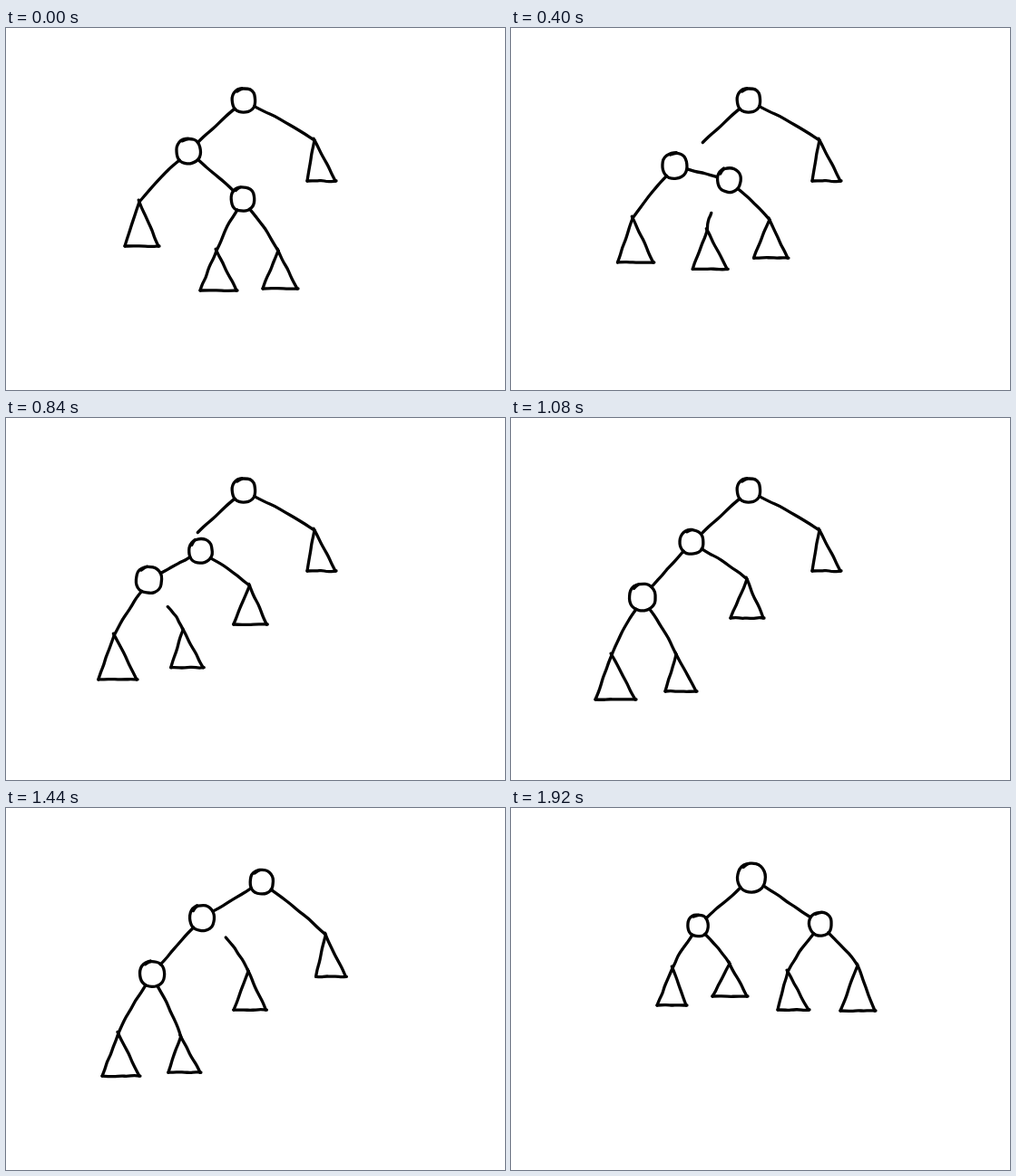
Write an HTML page with a canvas that moves like this. It is 550 px wide and 400 px high and loops after 2160 ms.

```html
<!DOCTYPE html>
<html lang="en">
<head>
<meta charset="utf-8">
<title>Tree rotation</title>
<style>
html, body { margin: 0; width: 550px; height: 400px; overflow: hidden; background: #fff; }
canvas { display: block; }
</style>
</head>
<body>
<canvas id="stage" width="550" height="400"></canvas>
<script>
const ctx = document.getElementById('stage').getContext('2d');
const LOOP = 2160;

// Pace of redrawing: from this time on, one drawing per interval
const paces = [[0, 160], [160, 80], [320, 40], [720, 80], [1080, 200], [1280, 80], [1840, 40], [1920, 240]];

// Every part has three resting poses and, for each of the two rotations, a bend of its path
const part = (poses, ...bends) => ({ poses, bends });

// Nodes: centre x, y, radius
const root = part([[262, 80, 13.5], [262, 80, 13.5], [341, 128, 13]], [0, 0], [-1, -14]);
const left = part([[201, 136, 14], [145, 198, 15], [206, 130, 12]], [-2, -5], [0, 4]);
const inner = part([[261, 189, 13.5], [199, 137, 13.5], [265, 77, 16]], [0, -4], [0, 0]);

// Subtrees: apex x, y, reach to the left and right, height
const leafA = part([[147, 192, 16, 21, 49], [111, 262, 18, 26, 49], [178, 177, 17, 15, 41]], [-1, -6], [-6, 12]);
const leafB = part([[232, 246, 18, 22, 44], [182, 261, 12, 22, 41], [241, 172, 19, 19, 36]], [1, -31], [-6, 19]);
const leafC = part([[300, 246, 17, 21, 42], [260, 178, 18, 18, 43], [305, 181, 11, 23, 42]], [-2, -13], [-6, 2]);
const leafD = part([[340, 124, 8, 23, 45], [340, 124, 8, 23, 45], [382, 174, 19, 19, 50]], [0, 0], [2, 4]);

const clamp = v => Math.min(1, Math.max(0, v));
const mix = (a, b, u) => a.map((v, i) => v + (b[i] - v) * u);

function at({ poses, bends }, turn, u) {
  const [x, y, ...size] = mix(poses[turn], poses[turn + 1], u);
  const [dx, dy] = bends[turn].map(d => d * 4 * u * (1 - u));
  return [x + dx, y + dy, ...size];
}

// Repeatable noise from a place, so parts at rest keep their shape
function noise(x, y) {
  const n = Math.sin(x * 12.9898 + y * 78.233) * 43758.5453;
  return (n - Math.floor(n)) * 2 - 1;
}

// Point on a node's outline that faces another place
function rim([x, y, r], [tx, ty]) {
  const d = Math.hypot(tx - x, ty - y);
  return [x + (tx - x) / d * r, y + (ty - y) / d * r];
}

function stroke(points) {
  ctx.beginPath();
  ctx.moveTo(...points[0]);
  for (let i = 1; i < points.length - 1; i++) {
    const [x, y] = points[i], [nx, ny] = points[i + 1];
    ctx.quadraticCurveTo(x, y, (x + nx) / 2, (y + ny) / 2);
  }
  ctx.lineTo(...points[points.length - 1]);
  ctx.stroke();
}

// Shaky line that may run past its end and bow upwards
function line([x1, y1], [x2, y2], over = 0, bow = 0) {
  const dx = x2 - x1, dy = y2 - y1, len = Math.hypot(dx, dy);
  const side = Math.sign(dx) || 1;
  const points = [];
  for (let i = 0; i <= 6; i++) {
    const f = i / 6 * (1 + over / len);
    const off = Math.sin(Math.PI * i / 6) * bow * side + (i % 6 ? noise(x1 + i, y2 - i) * 0.6 : 0);
    points.push([x1 + dx * f + dy / len * off, y1 + dy * f - dx / len * off]);
  }
  stroke(points);
}

function node([x, y, r]) {
  const start = -2.2 + noise(x, y) * 0.4;
  const points = [];
  for (let i = 0; i <= 17; i++) {
    const a = start + i * 0.4;
    const k = r * (0.99 - 0.03 * Math.cos(4 * a) - (i ? 0 : 0.12) + noise(x + i, y) * 0.03);
    points.push([x + Math.cos(a) * k, y + Math.sin(a) * k * 1.04]);
  }
  stroke(points);
}

function leaf(top, [x, y, l, r, h]) {
  const apex = [x, y], from = [x - l, y + h], to = [x + r, y + h];
  line(top, apex, 0, 1.5);
  line(apex, from);
  line(from, to, 1);
  line(to, apex, 2);
}

function draw(now) {
  const t = now % LOOP;
  const [since, pace] = paces.filter(([s]) => s <= t).pop();
  const time = since + Math.floor((t - since) / pace) * pace;

  // First rotation nearly steady, second one eased at both ends
  const turn = time < 1280 ? 0 : 1;
  const v = clamp(turn ? (time - 1200) / 720 : (time - 120) / 960);
  const u = turn ? v * v * (3 - 2 * v) : v * (1.2 - 0.2 * v);

  ctx.fillStyle = '#fff';
  ctx.fillRect(0, 0, 550, 400);
  ctx.strokeStyle = '#000';
  ctx.lineWidth = 3.3;
  ctx.lineCap = ctx.lineJoin = 'round';

  const [r, a, b, la, lb, lc, ld] = [root, left, inner, leafA, leafB, leafC, leafD].map(p => at(p, turn, u));
  [r, a, b].forEach(node);

  // The root's link waits in place until the inner node has come up
  const child = turn ? b : left.poses[0];
  line(rim(r, child), rim(child, r));
  line(rim(a, b), rim(b, a));

  // A subtree that changes parent slides freely from one to the other
  const slide = (moved, before, after) => mix(
    rim(before.poses[turn], moved.poses[turn]),
    rim(after.poses[turn + 1], moved.poses[turn + 1]), u);
  leaf(rim(a, la), la);
  leaf(turn ? rim(a, lb) : slide(leafB, inner, left), lb);
  leaf(turn ? slide(leafC, inner, root) : rim(b, lc), lc);
  leaf(rim(r, ld), ld);
}

const begin = performance.now();
function tick() {
  draw(performance.now() - begin);
  requestAnimationFrame(tick);
}
tick();
</script>
</body>
</html>
```
